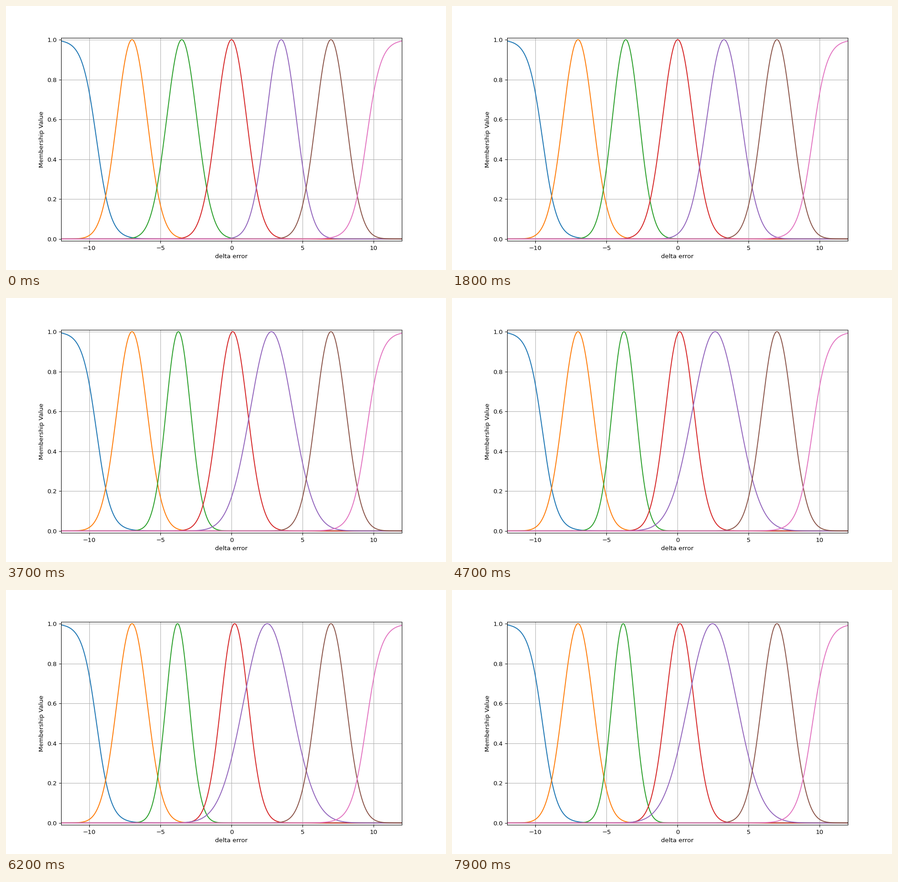
Recreate the animation shown at these times as a matplotlib script. Size 966x580 px, loop 8 s.

```python
import numpy as np
import matplotlib.pyplot as plt
from matplotlib.animation import FuncAnimation

FRAMES, STEP_MS = 80, 100
DEV = 1.06
X = np.linspace(-12, 12, 1000)


def gauss(mid, dev=DEV):
    return np.exp(-0.5 * ((X - mid) / dev) ** 2)


def sigmoid(mid, slope):
    return 1 / (1 + np.exp(-slope * (X - mid)))


def progress(n):
    """Training epochs done: four updates each, then a one-frame pause."""
    if n < 7:
        return 0.0
    epoch, r = divmod(n - 7, 5)
    return epoch + min(r + 1, 4) / 4


def curves(p):
    quick = p / (p + 5)                         # fast start, long tail
    ease = 1 - np.exp(-(p / 6) ** 1.6)          # slow start, then settles
    swing = np.exp(-((p - 11.8) / 5.8) ** 2)    # drifts out and back
    return [
        sigmoid(-9.5, -2 - 0.003 * p),
        gauss(-7),
        gauss(-3.5 - 0.43 * quick, DEV - 0.355 * quick),
        gauss(0.225 * swing, DEV + 0.07 * quick - 0.15 * swing),
        gauss(3.5 - 1.05 * ease, DEV + 0.66 * ease),
        gauss(7),
        sigmoid(9.5, 2 - 0.007 * p),
    ]


# A 10 x 6 inch layout scaled to 966 x 580 pixels
fig, ax = plt.subplots(figsize=(10, 6.00415), dpi=96.6)
lines = [ax.plot(X, y)[0] for y in curves(0)]
ax.set_xlim(-12, 12)
ax.set_ylim(-0.01, 1.01)
ax.set_xlabel("delta error")
ax.set_ylabel("Membership Value")
ax.grid(True)


def update(n):
    for line, y in zip(lines, curves(progress(n))):
        line.set_ydata(y)
    return lines


anim = FuncAnimation(fig, update, frames=FRAMES, interval=STEP_MS,
                     init_func=lambda: update(0), repeat=True, repeat_delay=0)
plt.show()
```
